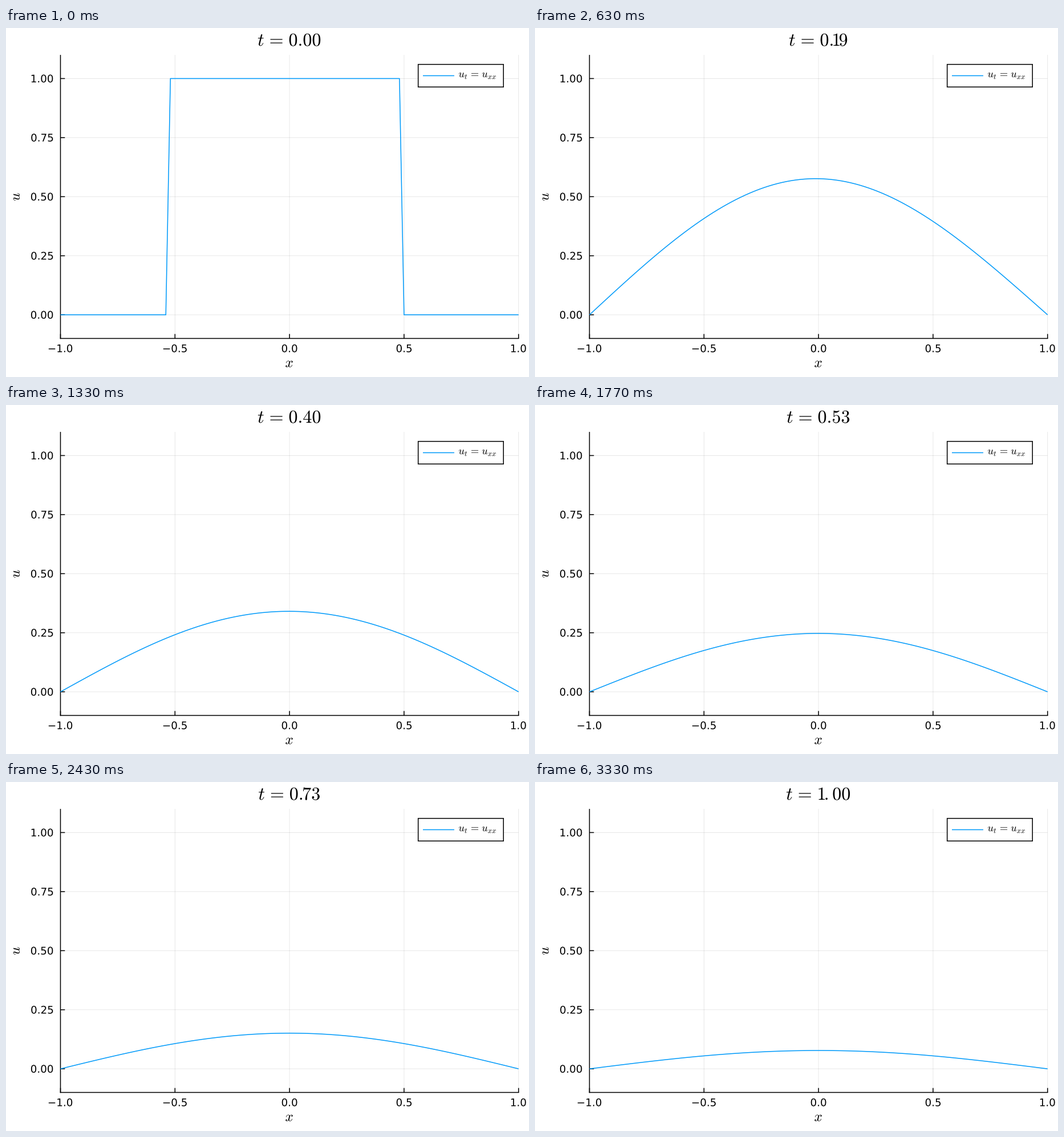
A matplotlib script for the animation above (3.36 s loop, 917x611 px).

```python
import numpy as np
import matplotlib.pyplot as plt
from matplotlib.animation import FuncAnimation
from matplotlib.lines import Line2D
from matplotlib.patches import PathPatch, Rectangle
from matplotlib.textpath import TextPath
from matplotlib.transforms import Affine2D

plt.rcParams["mathtext.fontset"] = "cm"

W, H, DPI = 917, 611, 64
PT = 72 / DPI                      # points per pixel
LEFT, RIGHT, TOP, BOTTOM = 95.5, 898.7, 47.1, 543.5
BLUE = "#009AFA"
STROKE = 1.53
TICK_SIZE, GUIDE_SIZE, TITLE_SIZE = 18.34, 25.2, 32.1

TICK_MS, LOOP_MS = 10, 3360
STEPS = 100

fig = plt.figure(figsize=(W / DPI, H / DPI), dpi=DPI, facecolor="white")
ax = fig.add_axes([0, 0, 1, 1])
ax.set_xlim(0, W)
ax.set_ylim(0, H)
ax.axis("off")


def px(x):
    return LEFT + (x + 1) / 2 * (RIGHT - LEFT)


def py(u):
    return BOTTOM - (u + 0.1) / 1.2 * (BOTTOM - TOP)


def line(xs, ys, color="black", width=STROKE, z=2, **kw):
    """Add a line given in pixels, y downwards."""
    art = Line2D(xs, H - np.asarray(ys, float), color=color, lw=width * PT,
                 solid_capstyle="butt", solid_joinstyle="round",
                 snap=False, zorder=z, **kw)
    return ax.add_line(art)


def text_path(s, size, x, base, anchor=0.5, angle=0):
    """Text outline whose inked box sits at x by its anchor (0 left, 1 right)."""
    path = TextPath((0, 0), s, size=size)
    box = path.get_extents()
    shift = -(box.x0 + anchor * box.width)
    move = Affine2D().translate(shift, 0).rotate_deg(angle).translate(x, H - base)
    return move.transform_path(path)


def text(*args, **kw):
    patch = PathPatch(text_path(*args, **kw), fc="black", lw=0,
                      snap=False, zorder=6)
    return ax.add_patch(patch)


# Title with tightened pairs around narrow digits
GAP = r"\hspace{0.117}"


def pair_kern(a, b):
    if "1" in (a, b):
        return -0.14
    if a + b == ".7":
        return -0.09
    return 0


def title_path(t):
    num = f"{t:.2f}"
    out = num[0]
    for a, b in zip(num, num[1:]):
        kern = pair_kern(a, b)
        if kern:
            # a dot not followed by a digit gets 0.2 of extra space
            out += r"\hspace{%.3f}" % (kern - 0.2 * (a == "."))
        out += b
    return text_path(f"$t{GAP}={GAP}{out}$", TITLE_SIZE, 496.5, 31.2)


# Heat equation on a grid with both ends held at zero
N = 100
x = np.linspace(-1, 1, N + 1)
start = np.zeros(N + 1)
start[24:75] = 1
modes = np.arange(1, N)
basis = np.sin(np.pi * np.outer(np.arange(N + 1), modes) / N)
coeffs = 2 / N * basis.T @ start
rates = (N * np.sin(np.pi * modes / (2 * N))) ** 2


def solution(t):
    return basis @ (coeffs * np.exp(-rates * t))


# Grid, axes and labels
for v in (-1, -0.5, 0, 0.5, 1):
    line([px(v)] * 2, [TOP, BOTTOM], width=0.9, z=1, alpha=0.1)
    line([px(v)] * 2, [BOTTOM, BOTTOM - 7.8])
    text(f"{v:.1f}".replace("-", "\u2212"), TICK_SIZE, px(v), 567.5)
for v in (0, 0.25, 0.5, 0.75, 1):
    line([LEFT, RIGHT], [py(v)] * 2, width=0.9, z=1, alpha=0.1)
    line([LEFT, LEFT + 7.8], [py(v)] * 2)
    text(f"{v:.2f}", TICK_SIZE, 82.3, py(v) + 6.7, anchor=1)
line([LEFT, LEFT], [TOP, BOTTOM + STROKE / 2])
line([LEFT - STROKE / 2, RIGHT + STROKE / 2], [BOTTOM, BOTTOM])
text("$x$", GUIDE_SIZE, 496.5, 593.8)
text("$u$", GUIDE_SIZE, 24, 295.8, angle=90)

# Legend
ax.add_patch(Rectangle((722.7, H - 103.3), 149.5, 39.6, fc="white", ec="black",
                       lw=STROKE * PT, snap=False, zorder=4))
line([731, 786], [83.5, 83.5], color=BLUE, z=5)
text(f"$u_t{GAP}={GAP}u_{{xx}}$", TICK_SIZE, 794, 86.2, anchor=0)

curve = line(px(x), py(start), color=BLUE, z=3)
title = text("$t$", TITLE_SIZE, 496.5, 31.2)

times = np.arange(STEPS + 1) / STEPS
titles = [title_path(t) for t in times]
heights = [H - py(solution(t)) for t in times]


def draw(tick):
    # 30 steps per second, each starting on the nearest tick
    step = min((30 * tick + 15) // 100, STEPS)
    curve.set_ydata(heights[step])
    title.set_path(titles[step])
    return curve, title


anim = FuncAnimation(fig, draw, frames=LOOP_MS // TICK_MS, interval=TICK_MS,
                     init_func=lambda: draw(0), repeat=True, repeat_delay=0)
plt.show()
```
